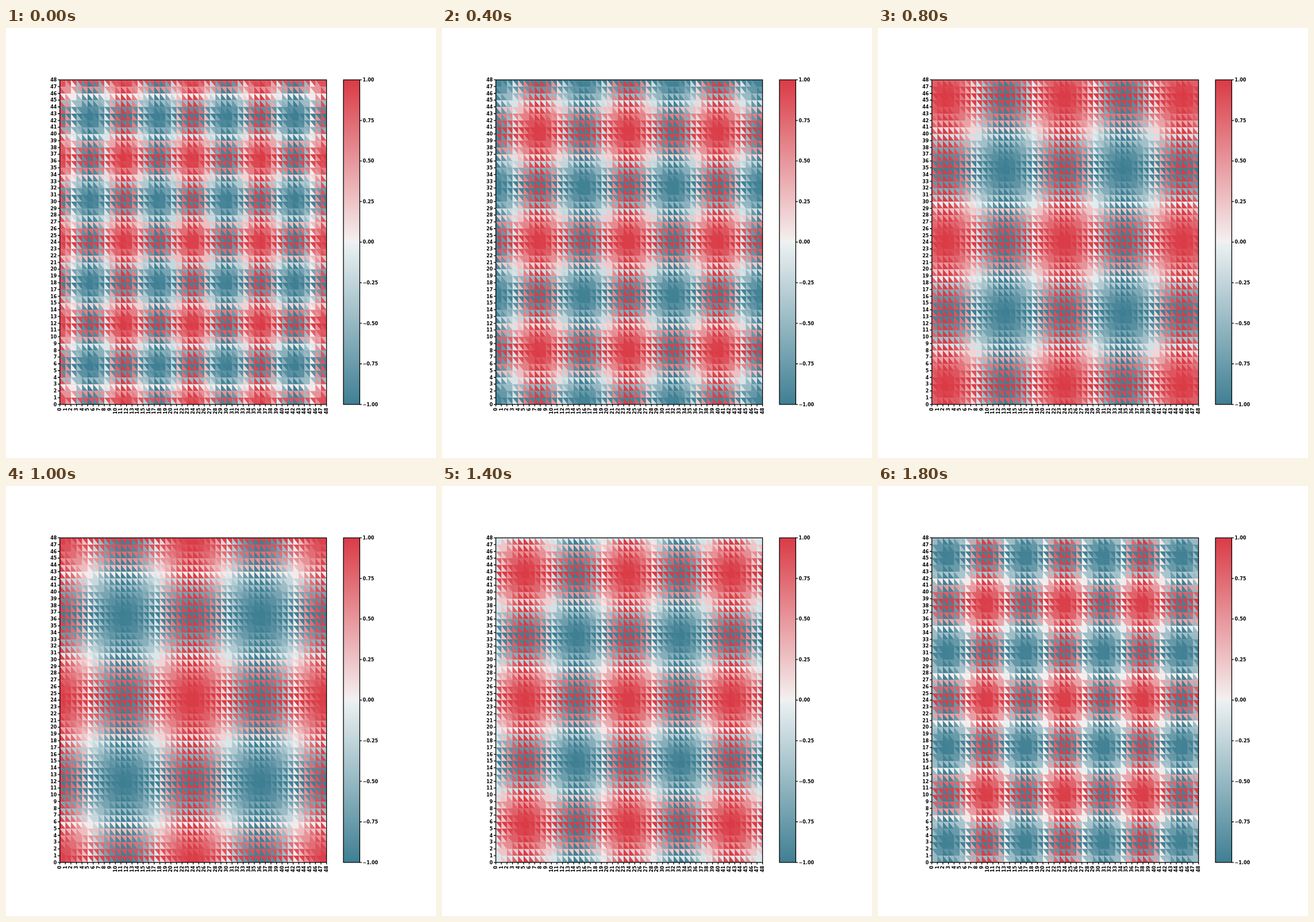
Animation, 748 px wide and 748 px high, one loop 2 s. Source, as an HTML page with a canvas:

```html
<!DOCTYPE html>
<html lang="en">
<head>
<meta charset="utf-8">
<title>Wave heatmap</title>
<style>
  html, body { margin: 0; width: 748px; height: 748px; overflow: hidden; background: #fff; }
  canvas, svg { position: absolute; left: 0; top: 0; }
  text { font: bold 8px "DejaVu Sans", sans-serif; }
  .line { fill: none; stroke: #000; stroke-width: 1.3; }
</style>
</head>
<body>
<canvas id="cells" width="748" height="748"></canvas>
<svg id="axes" width="748" height="748" viewBox="0 0 748 748">
  <defs>
    <linearGradient id="scale" x1="0" y1="0" x2="0" y2="1">
      <stop offset="0" stop-color="#da3b46"/>
      <stop offset=".498" stop-color="#f4f0f0"/>
      <stop offset=".5" stop-color="#f2f2f2"/>
      <stop offset=".502" stop-color="#ecf1f2"/>
      <stop offset="1" stop-color="#3f7f93"/>
    </linearGradient>
  </defs>
</svg>
<script>
const N = 48, STEP_MS = 200, STEPS = 10;
const L = 93.6, R = 557.6, T = 90.2, B = 654.8;
const W = (R - L) / N, H = (B - T) / N;
const BAR = { x: 587, w: 28.4 };

const RED = [[244, 240, 240], [218, 59, 70]];
const TEAL = [[236, 241, 242], [63, 127, 147]];
const ctx = document.getElementById('cells').getContext('2d');
const svg = document.getElementById('axes');

function add(tag, attrs, text = '') {
  const el = document.createElementNS('http://www.w3.org/2000/svg', tag);
  for (const key in attrs) el.setAttribute(key, attrs[key]);
  el.textContent = text;
  svg.append(el);
}

function drawAxes() {
  let ticks = '';
  for (let i = 0; i <= N; i++) {
    const x = L + i * W, y = B - i * H;
    ticks += `M${x} ${B}v3.5M${L} ${y}h-3.5`;
    add('text', { x: 88.3, y: y + 2.9, 'text-anchor': 'end' }, i);
    add('text', { transform: `translate(${x + 2.5} 660.7) rotate(-90)`, 'text-anchor': 'end' }, i);
  }
  const barRight = BAR.x + BAR.w;
  for (let i = 0; i <= 8; i++) {
    const v = 1 - i / 4, y = T + (B - T) * i / 8;
    ticks += `M${barRight} ${y}h3.5`;
    add('text', { x: 620.6, y: y + 2.9 }, v.toFixed(2).replace('-', '\u2212'));
  }
  add('rect', { x: BAR.x, y: T, width: BAR.w, height: B - T, class: 'line', style: 'fill:url(#scale)' });
  add('rect', { x: L, y: T, width: R - L, height: B - T, class: 'line' });
  add('path', { d: ticks, class: 'line' });
}

function color(v) {
  const [light, full] = v < 0 ? TEAL : RED;
  const a = Math.abs(v);
  if (a < 0.004) return '#f2f2f2';
  return `rgb(${light.map((c, i) => Math.round(c + (full[i] - c) * a))})`;
}

// Upper triangles follow the row's wave, lower ones the column's.
function drawCells(step) {
  const period = 12.25 * 2 ** (Math.min(step, STEPS - step) / 5);
  const wave = i => color(Math.cos(2 * Math.PI * (i - (N - 1) / 2) / period));
  for (let j = N - 1; j >= 0; j--) {
    ctx.fillStyle = wave(j);
    ctx.fillRect(L, B - (j + 1) * H, R - L, (j + 1) * H);
  }
  for (let i = 0; i < N; i++) {
    const x = L + i * W;
    ctx.fillStyle = wave(i);
    ctx.beginPath();
    for (let j = 0; j < N; j++) {
      const y = B - j * H;
      ctx.moveTo(x, y);
      ctx.lineTo(x + W, y);
      ctx.lineTo(x, y - H);
      ctx.closePath();
    }
    ctx.fill();
  }
}

let shown = -1;
function tick() {
  const step = Math.floor((performance.now() - start) / STEP_MS) % STEPS;
  if (step !== shown) drawCells(shown = step);
  requestAnimationFrame(tick);
}

drawAxes();
const start = performance.now();
tick();
</script>
</body>
</html>
```
